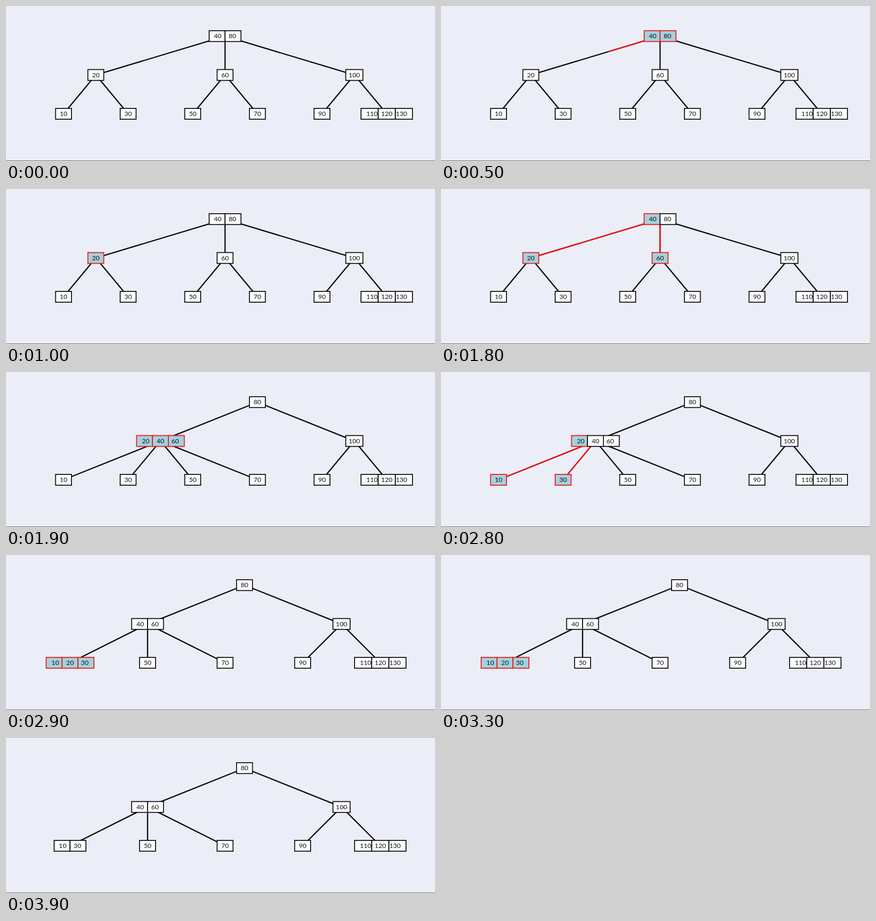
Write an HTML page that moves like this. It is 800x289 px and loops after 4700 ms.

```html
<!DOCTYPE html>
<html lang="en">
<head>
<meta charset="utf-8">
<title>Deleting a key from a 2-3-4 tree</title>
<style>
  html, body { margin: 0; width: 100%; height: 100%; overflow: hidden; background: #ebeef7; }
  svg { display: block; width: 100vw; height: 100vh; }
  line { stroke: #0a0a0a; stroke-width: 2.3; }
  rect { fill: #fefefe; stroke: #0a0a0a; stroke-width: 1.7; }
  text { font: 12.2px Lato, "Open Sans", sans-serif; text-anchor: middle; fill: #111; }
  line.hot { stroke: #f81212; }
  rect.hot { fill: #a4d1df; stroke: #f81212; }
  .floor { fill: #747679; stroke: none; }
</style>
</head>
<body>
<svg id="stage" viewBox="0 0 800 289" preserveAspectRatio="none"></svg>
<script>
const LOOP = 4700, TICK = 100, GROW_TICKS = 5;
const KEY_GAP = 27.5, CELL_H = 20.2;
const rowY = row => 56.2 + 72.4 * row;
const stage = document.getElementById('stage');

function add(parent, tag, attrs, text) {
  const el = document.createElementNS('http://www.w3.org/2000/svg', tag);
  for (const name in attrs) el.setAttribute(name, attrs[name]);
  if (text !== undefined) el.textContent = text;
  parent.appendChild(el);
  return el;
}

// A node is [x, row, keys, index of parent].
const before = [
  [408.5, 0, [40, 80]],
  [167.5, 1, [20], 0], [408.5, 1, [60], 0], [649.6, 1, [100], 0],
  [107.3, 2, [10], 1], [227.7, 2, [30], 1],
  [348.2, 2, [50], 2], [468.8, 2, [70], 2],
  [589.3, 2, [90], 3], [710, 2, [110, 120, 130], 3]
];
const rotated = [
  [468.8, 0, [80]],
  [288, 1, [20, 40, 60], 0], [649.6, 1, [100], 0],
  [107.3, 2, [10], 1], [227.7, 2, [30], 1],
  [348.2, 2, [50], 1], [468.8, 2, [70], 1],
  [589.3, 2, [90], 2], [710, 2, [110, 120, 130], 2]
];
const compact = leaf => [
  [444.8, 0, [80]],
  [264, 1, [40, 60], 0], [625.7, 1, [100], 0],
  [119.4, 2, leaf, 1], [264, 2, [50], 1], [408.5, 2, [70], 1],
  [553.2, 2, [90], 2], [698, 2, [110, 120, 130], 2]
];
const full = compact([10, 20, 30]);

// Each step: start time, tree, highlighted keys, children whose edge lights up.
const steps = [
  [0, before, [], []],
  [400, before, [40, 80], [1]],
  [900, before, [20], []],
  [1400, before, [20, 40, 60], [1, 2]],
  [1900, rotated, [20, 40, 60], []],
  [2400, rotated, [10, 20, 30], [3, 4]],
  [2900, full, [10, 20, 30], []],
  [3400, full, [20], []],
  [3900, compact([10, 30]), [], []]
];

function drawNode(group, [x, row, keys], hotKeys) {
  const y = rowY(row);
  const w = keys[0] > 99 ? 32 : 29.7;
  const mid = (keys.length - 1) / 2;
  keys.forEach((key, i) => add(group, 'rect', {
    x: x + (i - mid) * w - w / 2, y: y - CELL_H / 2, width: w, height: CELL_H,
    class: hotKeys.includes(key) ? 'hot' : ''
  }));
  keys.forEach((key, i) => add(group, 'text', { x: x + (i - mid) * KEY_GAP, y: y + 4 }, key));
}

function build([start, tree, hotKeys, hotEdges]) {
  const group = add(stage, 'g', { visibility: 'hidden' });
  const growing = [];
  tree.forEach(([x, row, , parent], i) => {
    if (parent === undefined) return;
    const [px, prow] = tree[parent];
    const ends = { x1: px, y1: rowY(prow), x2: x, y2: rowY(row) };
    add(group, 'line', ends);
    if (hotEdges.includes(i)) {
      growing.push({ ...ends, el: add(group, 'line', { ...ends, class: 'hot' }) });
    }
  });
  tree.forEach(node => drawNode(group, node, hotKeys));
  return { start, group, growing };
}

const scenes = steps.map(build);
add(stage, 'rect', { class: 'floor', x: 0, y: 288, width: 800, height: 1 });

function render(now) {
  const t = Math.floor(now % LOOP / TICK) * TICK;
  const current = scenes.filter(s => s.start <= t).pop();
  for (const s of scenes) s.group.setAttribute('visibility', s === current ? 'visible' : 'hidden');
  const p = Math.min(1, ((t - current.start) / TICK + 1) / GROW_TICKS);
  for (const { el, x1, y1, x2, y2 } of current.growing) {
    el.setAttribute('x2', x1 + (x2 - x1) * p);
    el.setAttribute('y2', y1 + (y2 - y1) * p);
  }
}

const origin = performance.now();
function loop() {
  render(performance.now() - origin);
  requestAnimationFrame(loop);
}
loop();
</script>
</body>
</html>
```
